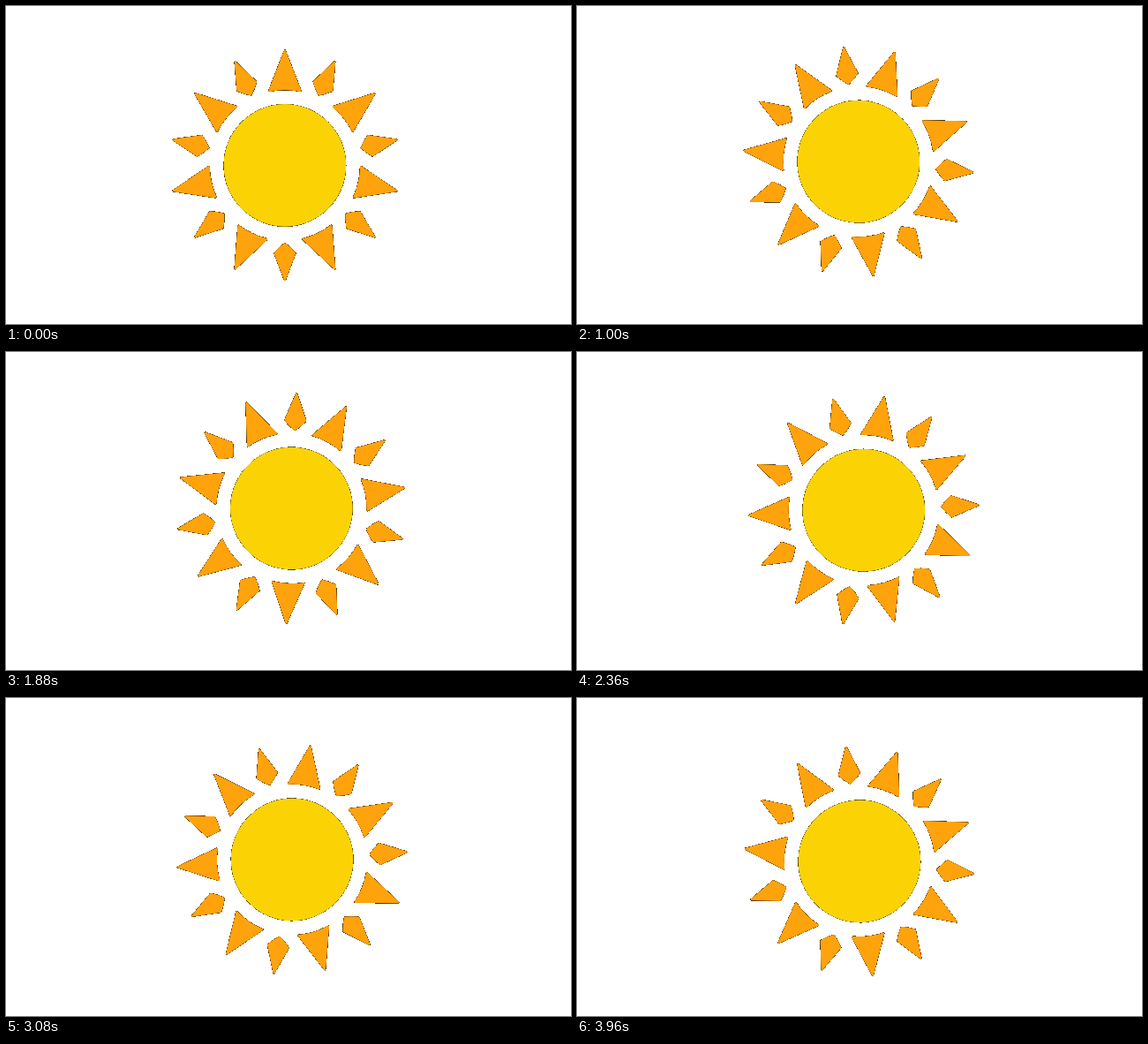
Write an HTML page with a canvas that moves like this. It is 640x360 px and loops after 4000 ms.

```html
<!DOCTYPE html>
<html lang="en">
<head>
<meta charset="utf-8">
<title>Turning sun</title>
<style>
  html, body { margin: 0; width: 100%; height: 100%; overflow: hidden; background: #fff; }
  canvas { display: block; }
</style>
</head>
<body>
<canvas id="stage" width="640" height="360"></canvas>
<script>
const WIDTH = 640, HEIGHT = 360;
const LOOP = 4000, STEP = 40;
const DEGREES_PER_SECOND = 69.75;
const PIVOT = { x: 320.4, y: 180.35 };
const SUN_OFFSET = -4.5;          // the sun sits slightly left of the pivot
const RAY_PAIRS = 7;
const EDGE_ALPHA = 60;            // fainter edge pixels are dropped

const ctx = document.getElementById('stage').getContext('2d', { willReadFrequently: true });
const radians = degrees => degrees * Math.PI / 180;

const bigRay = new Path2D('M0 -130 L17.8 -84.2 A86 86 0 0 0 -17.8 -84.2 Z');
const smallRay = new Path2D('M0 -130 L11.6 -99.4 Q6 -93 0 -88.8 Q-6 -93 -11.6 -99.4 Z');

function drawRay(path) {
  ctx.fill(path);
  ctx.stroke(path);               // rounds the corners
}

function drawSun(angle) {
  ctx.clearRect(0, 0, WIDTH, HEIGHT);
  ctx.save();
  ctx.translate(PIVOT.x, PIVOT.y);
  ctx.rotate(angle);
  ctx.translate(SUN_OFFSET, 0);

  ctx.fillStyle = '#fbd304';
  ctx.beginPath();
  ctx.arc(0, 0, 69.4, 0, 2 * Math.PI);
  ctx.fill();

  ctx.fillStyle = ctx.strokeStyle = '#ffa30c';
  ctx.lineWidth = 2;
  ctx.lineJoin = 'round';
  for (let i = 0; i < RAY_PAIRS; i++) {
    drawRay(bigRay);
    ctx.rotate(Math.PI / RAY_PAIRS);
    drawRay(smallRay);
    ctx.rotate(Math.PI / RAY_PAIRS);
  }
  ctx.restore();
}

// Blends soft edges with black and cuts them hard against the white page.
function hardenEdges() {
  const image = ctx.getImageData(0, 0, WIDTH, HEIGHT);
  const data = image.data;
  for (let i = 0; i < data.length; i += 4) {
    const alpha = data[i + 3];
    for (let c = i; c < i + 3; c++) {
      data[c] = alpha < EDGE_ALPHA ? 255 : data[c] * alpha / 255;
    }
    data[i + 3] = 255;
  }
  ctx.putImageData(image, 0, 0);
}

function render() {
  const time = Math.floor(performance.now() % LOOP / STEP) * STEP;
  drawSun(radians(DEGREES_PER_SECOND * time / 1000));
  hardenEdges();
  requestAnimationFrame(render);
}
render();
</script>
</body>
</html>
```
